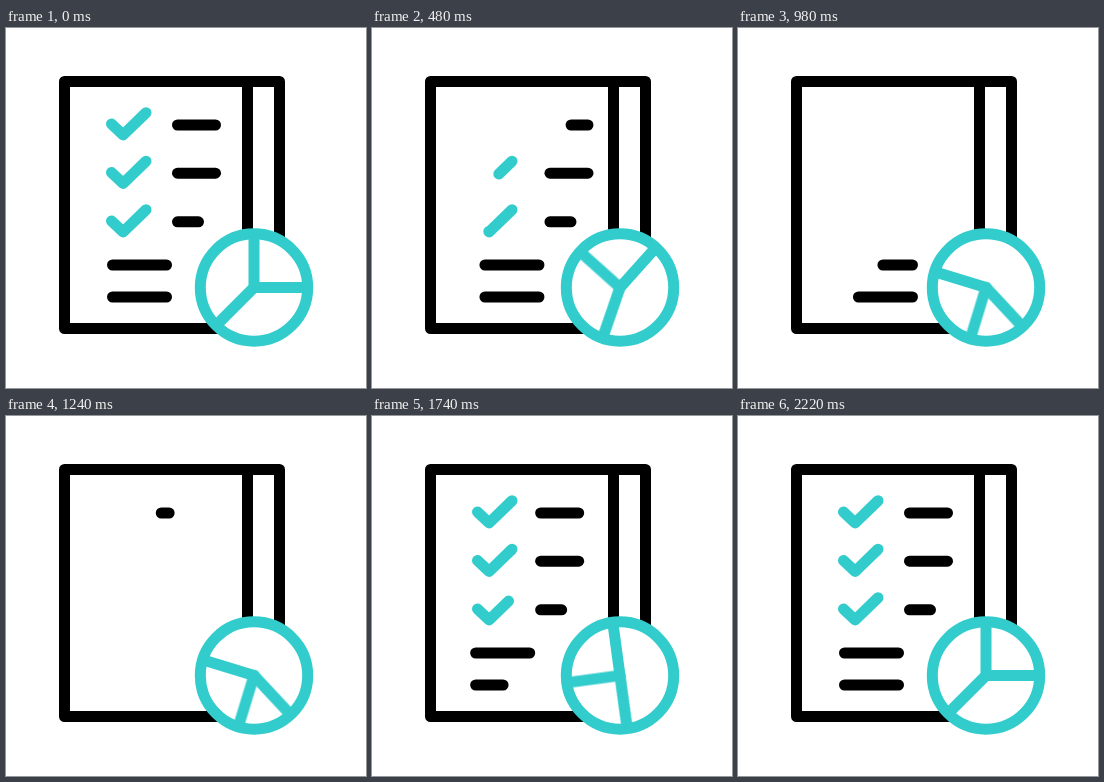
An HTML page that plays this animation: 360x360 px, repeating every 2400 ms.

```html
<!DOCTYPE html>
<html lang="en">
<head>
<meta charset="utf-8">
<title>Checklist report</title>
<style>
html, body { margin: 0; width: 100%; height: 100%; overflow: hidden; background: #fff; }
svg { display: block; width: 100vw; height: 100vh; }
path, circle { fill: none; stroke-width: 11; stroke-linecap: round; stroke-linejoin: round; }
.ink { stroke: #000; }
.teal { stroke: #33cccc; }
.spoke {
  transform-origin: 248px 259.5px;
  animation: turn 2400ms infinite;
}
.pair { --to: -163deg; }
.single { --to: -88deg; }
@keyframes turn {
  0%, 8.6% { transform: rotate(0deg); animation-timing-function: cubic-bezier(.333, 0, .667, 1); }
  40.4%, 59.2% { transform: rotate(var(--to)); animation-timing-function: cubic-bezier(.333, 0, .667, 1); }
  90%, 100% { transform: rotate(0deg); }
}
</style>
</head>
<body>
<svg viewBox="0 0 360 360">
  <path class="ink" d="M241.5 300.5H58.5V53.5H273.5V250M241.5 53.5V250"/>
  <g id="lines" class="ink"></g>
  <g id="checks" class="teal"></g>
  <circle cx="248" cy="259.5" r="53.7" class="teal" style="fill:#fff"/>
  <path class="teal spoke pair" d="M248 207V259.5H300"/>
  <path class="teal spoke single" d="M248 259.5L211 296.5"/>
</svg>
<script>
const LOOP = 2400, SWAP = 1200;
const byId = id => document.getElementById(id);
const clamp = x => Math.min(1, Math.max(0, x));
const smooth = p => p * p * (3 - 2 * p);
const square = p => p * p;

function stroke(parent, d) {
  const el = document.createElementNS('http://www.w3.org/2000/svg', 'path');
  el.setAttribute('d', d);
  parent.append(el);
  return { el, len: el.getTotalLength() };
}

// y, left, right, erase start, draw start, draw time
const lines = [
  [97, 171.5, 209.5, 395, 1200, 140],
  [145.2, 171.5, 209.5, 606, 1250, 140],
  [193.8, 171.5, 192.5, 756, 1305, 140],
  [237, 106.5, 160.5, 906, 1372, 200],
  [269, 106.5, 160.5, 1038, 1640, 200]
].map(([y, x1, x2, out, back, drawTime]) => ({
  ...stroke(byId('lines'), `M${x1} ${y}H${x2}`),
  out, back, drawTime, eraseTime: 160, ease: smooth
}));

// y, erase start, draw start
const checks = [
  [96, 150, 1252],
  [144.5, 230, 1370],
  [193, 299, 1484]
].map(([y, out, back]) => ({
  ...stroke(byId('checks'), `M105.5 ${y}l11.7 10.9L140 ${y - 11.3}`),
  out, back, drawTime: 320, eraseTime: 320, ease: square
}));

// Erases from the start of the stroke, then draws it again from the same end.
function trim(s, t) {
  const from = t < SWAP ? s.ease(clamp((t - s.out) / s.eraseTime)) : 0;
  const to = t < SWAP ? 1 : smooth(clamp((t - s.back) / s.drawTime));
  s.el.style.visibility = to - from > 0.001 ? 'visible' : 'hidden';
  s.el.style.strokeDasharray = `${(to - from) * s.len} ${s.len * 2}`;
  s.el.style.strokeDashoffset = -from * s.len;
}

function drift(t) {
  return t < SWAP
    ? 0.015 * Math.max(0, t - 50)
    : -2.2e-5 * square(Math.max(0, 2100 - t));
}

const spins = document.getAnimations();
for (const a of spins) a.pause();

function draw(now) {
  const t = now % LOOP;
  for (const a of spins) a.currentTime = t;
  for (const s of [...lines, ...checks]) trim(s, t);
  byId('lines').setAttribute('transform', `translate(${drift(t)} 0)`);
}

function tick() {
  draw(performance.now());
  requestAnimationFrame(tick);
}
tick();
</script>
</body>
</html>
```
